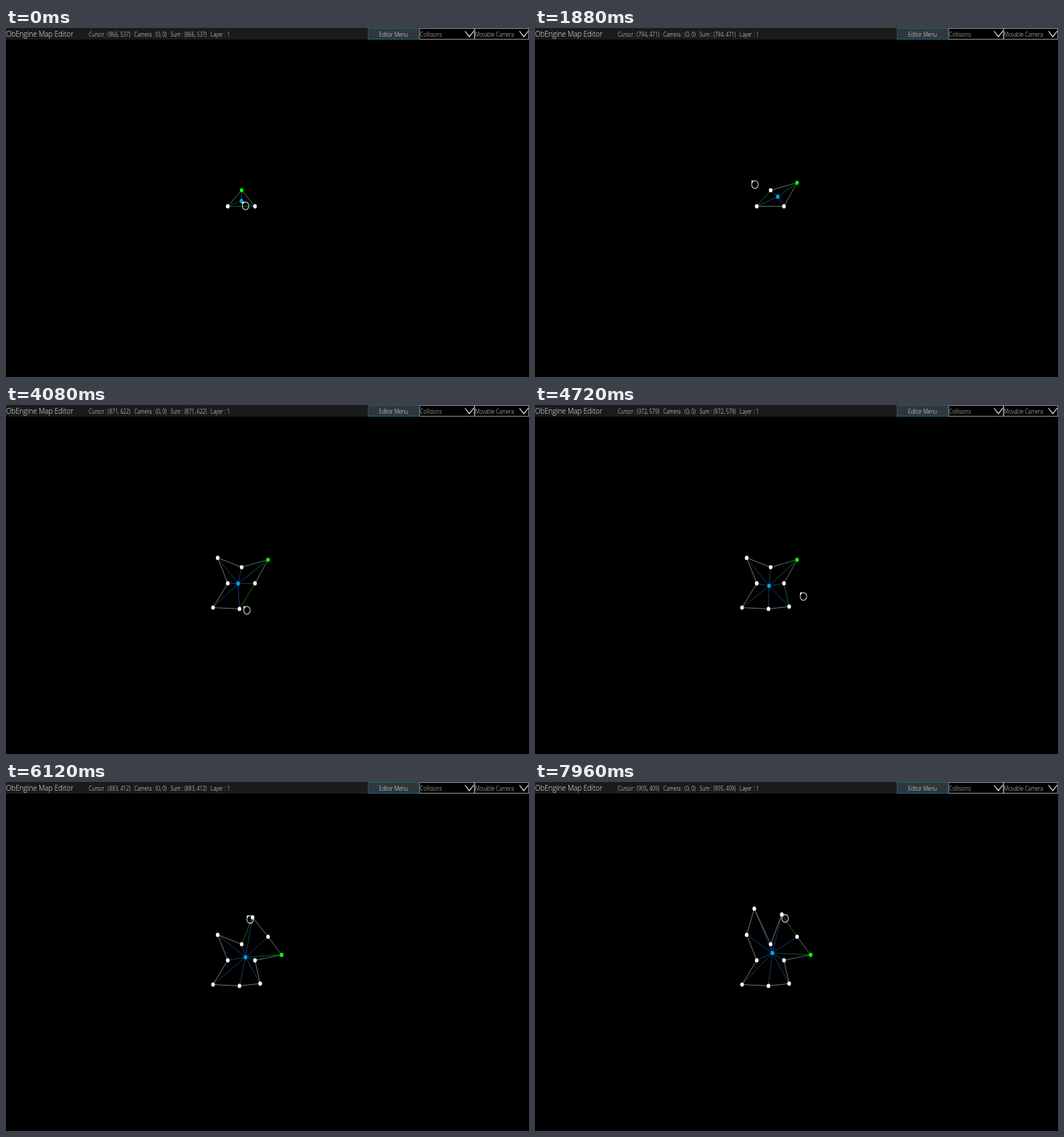
Write an HTML page with a canvas that moves like this. It is 720 px wide and 480 px high and loops after 8 s.

```html
<!DOCTYPE html>
<html lang="en">
<head>
<meta charset="utf-8">
<title>Map editor</title>
<style>
  html, body { margin: 0; width: 100%; height: 100%; overflow: hidden; background: #000; }
  canvas { display: block; width: 720px; height: 480px; }
</style>
</head>
<body>
<canvas id="stage" width="720" height="480"></canvas>
<script>
const ctx = document.getElementById('stage').getContext('2d');
const LOOP = 8000, STEP = 40;
const WORLD = { w: 1920, h: 1080 };
const FONT = '"Open Sans", "Noto Sans", sans-serif';

const ease = {
  hold: p => 0,
  line: p => p,
  in: p => p * p,
  out: p => p * (2 - p),
  both: p => p * p * (3 - 2 * p)
};

// Cursor path in world units: time, x, y, easing towards this stop
const path = [
  [0, 866, 537, 'hold'],
  [400, 866, 537, 'hold'],
  [1000, 961, 478, 'both'],
  [1240, 961, 478, 'hold'],
  [1880, 794, 471, 'in'],
  [2000, 776, 472, 'out'],
  [2440, 776, 472, 'hold'],
  [3160, 856, 630, 'both'],
  [3280, 856, 630, 'hold'],
  [3320, 853, 631, 'line'],
  [3720, 759, 626, 'both'],
  [3880, 759, 626, 'hold'],
  [4080, 871, 622, 'in'],
  [4240, 932, 623, 'out'],
  [4480, 932, 623, 'hold'],
  [4960, 1011, 534, 'both'],
  [5240, 1011, 534, 'hold'],
  [5360, 992, 496, 'in'],
  [5640, 904, 418, 'out'],
  [5920, 904, 418, 'hold'],
  [6600, 804, 391, 'both'],
  [7160, 804, 391, 'hold'],
  [7560, 904, 418, 'both'],
  [7680, 904, 418, 'hold'],
  [7920, 905, 409, 'both']
];

const startPoints = [[913, 551], [813, 551], [864, 501]];

// Inserted points: time, list index, x, y
const inserts = [
  [1120, 3, 961, 478],
  [2080, 2, 776, 472],
  [3320, 1, 856, 630],
  [3880, 2, 759, 626],
  [4360, 1, 932, 623],
  [5080, 8, 1011, 534],
  [5760, 7, 904, 418],
  [6720, 6, 804, 391]
];
const drag = { from: 7680, index: 8 };

function cursorAt(t) {
  const next = path.findIndex(k => k[0] > t);
  if (next < 0) return path[path.length - 1].slice(1, 3);
  const [t0, x0, y0] = path[next - 1];
  const [t1, x1, y1, kind] = path[next];
  const p = ease[kind]((t - t0) / (t1 - t0));
  return [Math.round(x0 + (x1 - x0) * p), Math.round(y0 + (y1 - y0) * p)];
}

function pointsAt(t, cursor) {
  const pts = startPoints.slice();
  for (const [time, index, x, y] of inserts) {
    if (t >= time) pts.splice(index, 0, [x, y]);
  }
  if (t >= drag.from) pts[drag.index] = cursor;
  return pts;
}

// Area centroid of the polygon
function centroid(pts) {
  let area = 0, cx = 0, cy = 0;
  pts.forEach(([x, y], i) => {
    const [u, v] = pts[(i + 1) % pts.length];
    const cross = x * v - u * y;
    area += cross;
    cx += (x + u) * cross;
    cy += (y + v) * cross;
  });
  return [cx / (3 * area), cy / (3 * area)];
}

function edgeDistance([px, py], [ax, ay], [bx, by]) {
  const dx = bx - ax, dy = by - ay;
  const k = ((px - ax) * dx + (py - ay) * dy) / (dx * dx + dy * dy);
  const c = Math.max(0, Math.min(1, k));
  return Math.hypot(px - ax - dx * c, py - ay - dy * c);
}

function nearestEdge(pts, cursor) {
  let best = Infinity, found = 0;
  pts.forEach((p, i) => {
    const d = edgeDistance(cursor, p, pts[(i + 1) % pts.length]);
    if (d <= best) { best = d; found = i; }
  });
  return found;
}

function stroke(color, width, ...pts) {
  ctx.strokeStyle = color;
  ctx.lineWidth = width;
  ctx.beginPath();
  pts.forEach(p => ctx.lineTo(...p));
  ctx.stroke();
}

function blend(a, b, from, to) {
  const g = ctx.createLinearGradient(...a, ...b);
  g.addColorStop(0, from);
  g.addColorStop(1, to);
  return g;
}

function dot([x, y], color) {
  ctx.fillStyle = color;
  ctx.beginPath();
  ctx.arc(x, y, 6.6, 0, Math.PI * 2);
  ctx.fill();
}

function label(str, x, y, size, color) {
  ctx.font = `300 ${size}px ${FONT}`;
  ctx.fillStyle = color;
  ctx.fillText(str, x, y);
}

function box(x, w, fill, line) {
  ctx.fillStyle = fill;
  ctx.fillRect(x, 0, w, 36);
  ctx.strokeStyle = line;
  ctx.lineWidth = 2.4;
  ctx.strokeRect(x + 1.2, 1.2, w - 2.4, 33.6);
}

function combo(x, w, str) {
  box(x, w, '#000', '#8a8a8a');
  label(str, x + 2, 26, 19, '#e0e0e0');
  const r = x + w;
  stroke('#e8e8e8', 2.8, [r - 35, 10], [r - 19, 27], [r - 3, 10]);
}

function drawHeader([x, y]) {
  ctx.fillStyle = '#1b1b1b';
  ctx.fillRect(0, 0, WORLD.w, 36);
  label('ObEngine Map Editor', 0, 27, 25.8, '#f4f4f4');
  const at = `(${x}, ${y})`;
  label(`Cursor : ${at}   Camera : (0, 0)   Sum : ${at}   Layer : 1`, 304, 26, 18.5, '#f0f0f0');
  box(1328, 190, '#30373c', '#1c5c7c');
  label('Editor Menu', 1370, 26, 19, '#f0f0f0');
  combo(1518, 202, 'Collisions');
  combo(1720, 200, 'Movable Camera');
}

function drawPolygon(pts, cursor) {
  const mid = centroid(pts), hot = nearestEdge(pts, cursor), last = pts.length - 1;
  const tone = (i, first, other) => i === last ? first : other;
  pts.forEach((p, i) => {
    stroke(blend(mid, p, '#104c84', tone(i, '#147a34', '#1c4c78')), 1.9, mid, p);
  });
  pts.forEach((p, i) => {
    const j = (i + 1) % pts.length, q = pts[j];
    const plain = blend(p, q, tone(i, '#4c964c', '#909090'), tone(j, '#4c964c', '#909090'));
    stroke(i === hot ? '#0c8a0c' : plain, 1.9, p, q);
  });
  pts.forEach((p, i) => dot(p, tone(i, '#00ff00', '#fff')));
  dot(mid, '#00a0ff');
}

function drawCursor([x, y]) {
  ctx.fillStyle = '#e8e8e8';
  ctx.beginPath();
  ctx.moveTo(x, y);
  ctx.lineTo(x + 9, y);
  ctx.lineTo(x, y + 9);
  ctx.fill();
  ctx.strokeStyle = '#e8e8e8';
  ctx.lineWidth = 2.4;
  ctx.beginPath();
  ctx.arc(x + 12.4, y + 12.4, 12, 0, Math.PI * 2);
  ctx.stroke();
}

function useWorld(shift) {
  ctx.setTransform(720 / WORLD.w, 0, 0, 480 / WORLD.h, shift, shift);
}

function render(t) {
  useWorld(0);
  ctx.fillStyle = '#000';
  ctx.fillRect(0, 0, WORLD.w, WORLD.h);
  const cursor = cursorAt(t);
  drawHeader(cursor);
  useWorld(0.4); // centre the scene on whole pixels
  drawPolygon(pointsAt(t, cursor), cursor);
  drawCursor(cursor);
}

const start = performance.now();
function tick() {
  const t = (performance.now() - start) % LOOP;
  render(Math.floor(t / STEP) * STEP);
  requestAnimationFrame(tick);
}
tick();
</script>
</body>
</html>
```
